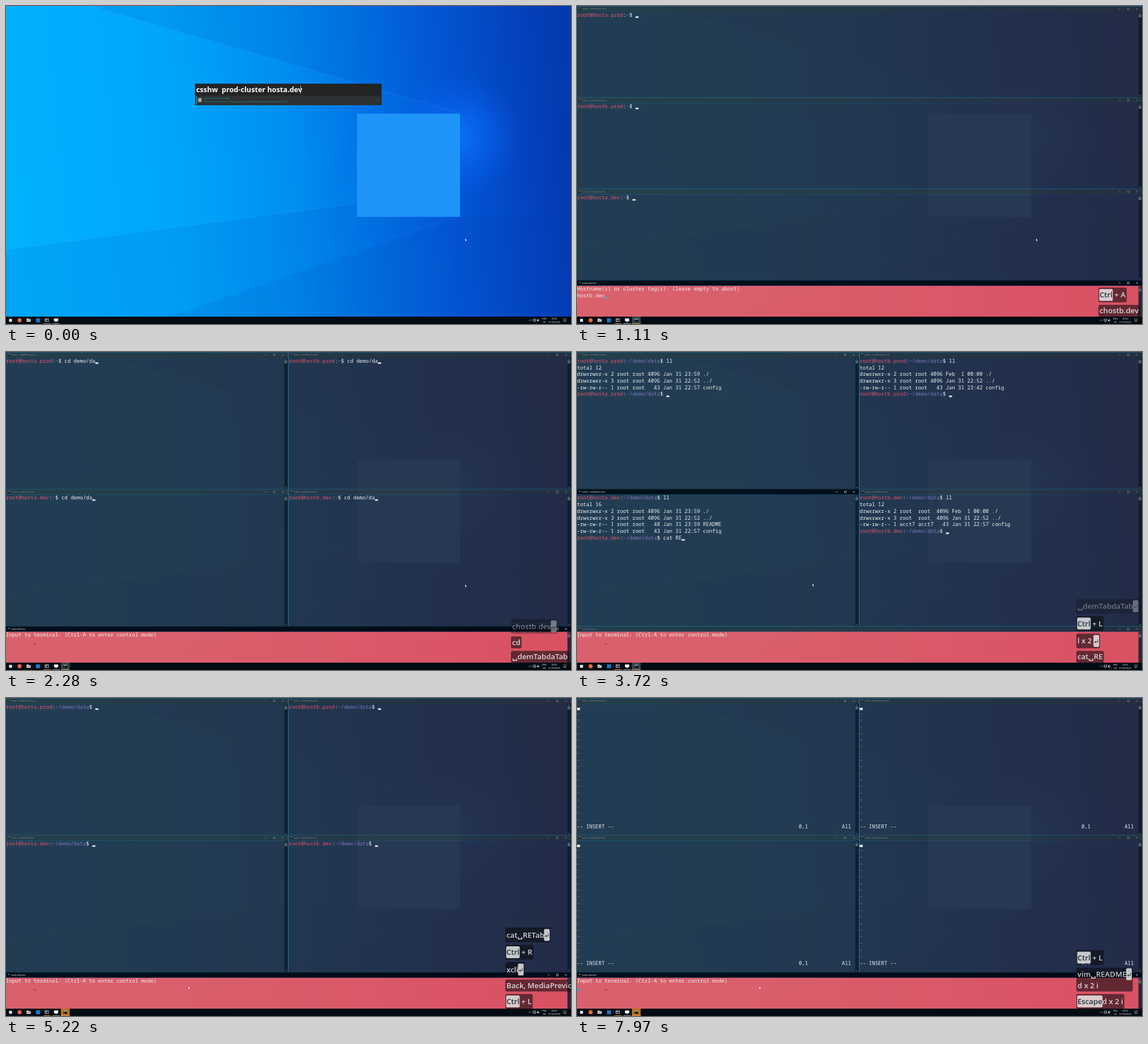
These frames come from a looping animation (998x561 px, 8000 ms). An HTML page with a canvas:

```html
<!DOCTYPE html>
<html lang="en">
<head>
<meta charset="utf-8">
<title>Cluster terminals</title>
<style>
html, body { margin: 0; width: 100%; height: 100%; overflow: hidden; background: #000; }
canvas { display: block; }
</style>
</head>
<body>
<canvas id="stage" width="998" height="561"></canvas>
<script>
const W = 998, H = 561, LOOP = 8000;
const CW = 5.44, LH = 11.72;
const MONO = '9.067px "Noto Sans Mono", "DejaVu Sans Mono", monospace';
const UI = '"Noto Sans", "Open Sans", sans-serif';
const KEYS = '600 13.2px "Open Sans", "Noto Sans", "DejaVu Sans", sans-serif';
const RED = '#e0576a', PURPLE = '#7f78c0', WHITE = '#eef1f2';
const HOSTS = ['hosta.prod', 'hostb.prod', 'hosta.dev', 'hostb.dev'];

const stage = document.getElementById('stage');
let g = stage.getContext('2d');

function box(x, y, w, h, color) {
  g.fillStyle = color;
  g.fillRect(x, y, w, h);
}

function poly(color, ...p) {
  g.fillStyle = color;
  g.beginPath();
  for (let i = 0; i < p.length; i += 2) g.lineTo(p[i], p[i + 1]);
  g.fill();
}

function line(color, width, ...p) {
  g.strokeStyle = color;
  g.lineWidth = width;
  g.beginPath();
  for (let i = 0; i < p.length; i += 2) g.lineTo(p[i], p[i + 1]);
  g.stroke();
}

function label(s, x, y, font, color) {
  g.font = font;
  g.fillStyle = color;
  g.fillText(s, x, y);
}

const typed = (t, start, step, s) =>
  t < start ? '' : s.slice(0, Math.floor((t - start) / step) + 1);
const after = (t, start, s) => t >= start ? s : '';

// Wallpaper, painted once
function paintWallpaper() {
  const c = document.createElement('canvas');
  c.width = W;
  c.height = H;
  const main = g;
  g = c.getContext('2d');
  const base = g.createLinearGradient(0, 330, W, 230);
  [[0, '#00b2ff'], [.3, '#00a6fb'], [.5, '#008ff1'], [.64, '#0074e6'],
   [.78, '#0358d8'], [.9, '#0345c2'], [1, '#0338ae']].forEach(s => base.addColorStop(...s));
  box(0, 0, W, H, base);
  poly('rgba(0,70,180,.13)', 150, 0, 800, 189, W, 189, W, 0);
  poly('rgba(0,70,180,.11)', 0, 430, 620, 348, 800, 373, W, 373, W, H, 0, H);
  poly('rgba(0,60,170,.1)', 800, 373, 250, H, W, H, W, 373);
  const glow = g.createRadialGradient(800, 230, 5, 800, 230, 110);
  glow.addColorStop(0, 'rgba(10,120,255,.75)');
  glow.addColorStop(1, 'rgba(10,100,255,0)');
  box(680, 110, 240, 250, glow);
  line('rgba(60,170,255,.28)', 1, 150, 0, 800, 189);
  line('rgba(60,200,255,.2)', 1, 0, 430, 620, 348);
  line('rgba(40,140,255,.2)', 1, 800, 373, 280, 530);
  box(620, 190, 182, 182, '#1f94f8');
  g = main;
  return c;
}

function launcher() {
  box(334, 137, 329.5, 38, '#222426');
  box(334, 158, 329.5, 17, '#2e3031');
  label('csshw  prod-cluster hosta.dev', 336, 152.4, '600 12.7px ' + UI, '#fff');
  box(520, 140, .8, 15, '#ccc');
  box(336, 159.5, 1.5, 14, '#1898ae');
  box(339.5, 162.5, 6, 7, '#a8a8a8');
  label('prod-cluster hosta.dev', 350, 164, '4.3px ' + UI, '#1f9db0');
  label('Custom command: C:\\Programming\\csshw\\target\\debug\\csshw.exe {{*}}', 350, 170, '4.3px ' + UI, '#1f9db0');
  label('#1', 655, 167.5, '4px ' + UI, '#1f8292');
}

function consoleIcon(x, y, s) {
  box(x - s, y - s * .8, s * 2, s * 1.6, '#05090c');
  box(x - s, y - s * .8, s * 2, s * .4, '#bfc8cc');
  line('#ddd', s * .2, x - s * .6, y - s * .1, x - s * .2, y + s * .2, x - s * .6, y + s * .5);
}

function taskbar(t) {
  box(0, 548, W, 13, '#030c13');
  const open = t >= 140, alert = t >= 5090;
  if (open) box(97, 548, 15.5, 13, alert ? '#b9721d' : '#33464c');
  box(5.5, 552, 5, 5, '#fff');
  g.fillStyle = '#f0663a';
  g.beginPath();
  g.arc(24, 554.3, 3.6, 0, 7);
  g.fill();
  poly('#e6e6e6', 36.5, 551.5, 39.5, 551.5, 40.5, 552.5, 43.5, 552.5, 43.5, 557, 36.5, 557);
  box(38, 554, 4, 1, '#39474f');
  box(53, 551, 7, 7, '#1478cc');
  box(68.5, 551.5, 7, 5.5, '#dce2e4');
  box(69.2, 552.7, 5.6, 3.6, '#182027');
  line('#fff', .7, 70, 553.2, 71.5, 554.4, 70, 555.6);
  box(84.8, 551.3, 7.4, 4.8, '#fff');
  box(87.5, 556, 2, 1.5, '#fff');
  if (open) {
    consoleIcon(104.7, 554.5, 3.2);
    box(97, 560, 15.5, 1, '#d98b45');
  }
  box(66, 560, 13, 1, open ? '#d98b45' : '#8fa6b0');
  box(82, 560, 13, 1, '#8fa6b0');
  const ink = '#e4e8ea', f = '4px ' + UI;
  line(ink, .7, 923.8, 555.5, 925.8, 553.5, 927.8, 555.5);
  g.strokeStyle = ink;
  g.lineWidth = .7;
  g.strokeRect(931, 552.5, 4.8, 3.2);
  box(932.5, 556.5, 2, .7, ink);
  poly(ink, 938, 553.5, 939.2, 553.5, 940.7, 552, 940.7, 557, 939.2, 555.6, 938, 555.6);
  line('#8a9399', .5, 942, 552.8, 942.7, 554.5, 942, 556.2);
  g.textAlign = 'center';
  label('ENG', 951, 553.2, f, ink);
  label('UK', 951, 559, f, ink);
  label('00:02', 968.5, 553.2, f, ink);
  label('01/02/2025', 968.5, 559, f, ink);
  g.textAlign = 'left';
  g.strokeStyle = ink;
  g.strokeRect(985, 552, 4.6, 3.8);
  box(986.5, 556, 1.4, 1.2, ink);
}

function frame(x, y, w, h, title, active, body = 'rgba(40,42,54,.85)') {
  box(x, y, w, 10, active ? 'rgba(1,8,15,.95)' : 'rgba(42,46,48,.87)');
  box(x, y + 10, w, h - 10, body);
  box(x, y, w, .8, active ? '#153646' : '#1c6288');
  const cy = y + 5, r = x + w, ink = active ? '#f2f4f5' : '#7f8d94';
  consoleIcon(x + 5, cy, 1.8);
  label(title, x + 8.7, cy + 1.3, '3.7px ' + UI, ink);
  line(ink, .6, r - 41, cy, r - 38, cy);
  g.strokeStyle = ink;
  g.strokeRect(r - 25.6, cy - 1.5, 3, 3);
  line(ink, .6, r - 10.5, cy - 1.6, r - 7.3, cy + 1.6);
  line(ink, .6, r - 10.5, cy + 1.6, r - 7.3, cy - 1.6);
  box(r - 6.3, y + 10, 6.3, h - 10, 'rgba(12,28,42,.82)');
  box(r - 6, y + 14.5, 4.6, 5.5, '#53636e');
  poly('#8c9aa2', r - 5, y + 12.8, r - 3.7, y + 11.3, r - 2.4, y + 12.8);
  if (h > 100) poly('#8c9aa2', r - 5, y + h - 3.2, r - 3.7, y + h - 1.7, r - 2.4, y + h - 3.2);
}

const write = (s, x, y, color = WHITE) => label(s, x, y, MONO, color);

function cursor(x, y, color = '#e4e9ea') {
  box(x, y - .5, CW, 2.6, color);
}

// A prompt line is [host, path, command]; anything else is plain output
function drawLines(lines, x, y) {
  lines.forEach((l, i) => {
    const by = y + i * LH;
    let n = l.length;
    if (Array.isArray(l)) {
      const [host, path, cmd] = l, who = 'root@' + host;
      let cx = x;
      for (const [s, c] of [[who, RED], [':', WHITE], [path, PURPLE], ['$ ' + cmd, WHITE]]) {
        write(s, cx, by, c);
        cx += s.length * CW;
      }
      n = who.length + path.length + cmd.length + 3;
    } else write(l, x, by);
    if (i === lines.length - 1) cursor(x + n * CW, by);
  });
}

function listing(i) {
  const wide = i === 3, who = wide ? 'acct7 acct7' : 'root root', gap = wide ? 'root  root ' : 'root root';
  const rows = [
    i === 2 ? 'total 16' : 'total 12',
    `drwxrwxr-x 2 ${gap} 4096 ${i % 2 ? 'Feb  1 00:00' : 'Jan 31 23:59'} ./`,
    `drwxrwxr-x 3 ${gap} 4096 Jan 31 22:52 ../`
  ];
  if (i === 2) rows.push('-rw-rw-r-- 1 root root   48 Jan 31 23:59 README');
  rows.push(`-rw-rw-r-- 1 ${who}   43 Jan 31 ${i === 1 ? '23:42' : '22:57'} config`);
  return rows;
}

const NOTE = 'This demo file is shared by the whole cluster.';

function shell(i, t) {
  const host = HOSTS[i], home = '~', data = '~/demo/data';
  const ready = [490, 350, 560, 1500][i];
  if (t < ready) return [''];
  if (t < 2410) {
    const cmd = typed(t, 1730, 60, 'cd') + typed(t, 1870, 50, ' dem') +
      after(t, 2080, 'o/') + typed(t, 2150, 60, 'da') + after(t, 2340, 'ta/');
    return [[host, home, cmd]];
  }
  if (t < 2540) return [[host, home, 'cd demo/data/'], [host, data, '']];
  if (t >= 5150) {
    const cmd = typed(t, 5500, 75, 'vim READ') + typed(t, 6190, 70, 'ME');
    return [[host, data, cmd]];
  }
  const lines = [[host, data, typed(t, 2680, 90, 'll')]];
  if (t < 2920) return lines;
  lines.push(...listing(i));
  if (i !== 2) return [...lines, [host, data, '']];
  lines.push([host, data, typed(t, 3370, 60, 'cat RE') + after(t, 3790, 'ADME')]);
  if (t < 4000) return lines;
  lines.push(NOTE);
  const copy = 'cat README | xclip';
  if (t >= 4210 && t < 4700) {
    const q = typed(t, 4350, 70, 'xcli');
    lines.push("(reverse-i-search)`" + q + "': " + (q ? copy : ''));
  } else if (t >= 4700) lines.push([host, data, copy], [host, data, '']);
  else lines.push([host, data, '']);
  return lines;
}

function editor(i, t, x, y) {
  const full = i === 2 && t < 6760;
  const insert = t >= 6900 && t < 7130 || t >= 7900;
  if (full) write(NOTE, x, y);
  box(x, y - 1.6, CW, 4.2, '#dfe5e8');
  for (let r = 1; r < 18; r++) write('~', x, y + r * LH, PURPLE);
  const by = y + 18 * LH;
  let msg = '';
  if (insert) msg = '-- INSERT --';
  else if (t < 6760) msg = i === 2 ? '"README" 1L, 48C' : '"README" [New File]';
  else if (t < 6900 || t >= 7480) msg = '--No lines in buffer--';
  write(msg, x, by);
  write(full ? '1,1' : insert ? '0,1' : '0,0-1', x + 72 * CW, by);
  write('All', x + 86 * CW, by);
}

function loading(y, w, h, top) {
  box(655, y + 10, 337, 145, 'rgba(1,7,18,.94)');
  box(655, top, w, h, '#dcebfa');
  box(0, y + 155, 992, 6, 'rgba(12,28,42,.82)');
  box(5, y + 155.5, 6, 5, '#53636e');
}

function rows(t) {
  for (let i = 0; i < 3; i++) {
    const y = i * 161.2, opening = t < 350 && i !== 1;
    frame(0, y, W, 161.2, opening ? 'csshw.exe' : 'csshw - root@' + HOSTS[i], opening && i === 0);
    if (opening) i ? loading(y, 60, 80, 332) : loading(y, 68, 97, 58);
    if (i !== 1 || t >= 350) drawLines(shell(i, t), 0, y + 18.8);
  }
}

function grid(t) {
  for (let i = 0; i < 4; i++) {
    const x = i % 2 ? 499 : 0, y = i > 1 ? 241.6 : 0;
    const title = i === 3 && t < 1500 ? 'csshw.exe' : 'csshw - root@' + HOSTS[i];
    frame(x, y, i % 2 ? 499 : 498, 242, title, i === 2 && t >= 3300 && t < 5090);
    const tx = i % 2 ? 499.3 : 0, ty = y + 18.8;
    if (t < 6480) drawLines(shell(i, t), tx, ty);
    else editor(i, t, tx, ty);
  }
  box(498, 0, 1, 484, '#1d7fae');
}

function daemon(t) {
  const active = t >= 350 && (t < 3300 || t >= 5090);
  frame(0, 483.6, W, 65, 'csshw daemon', active, 'rgba(255,85,85,.85)');
  if (t < 350) return;
  const y = 502.3;
  if (t >= 620 && t < 830) {
    write('Control Mode (Esc to exit)', 0, y);
    write('[c]reate window(s), [r]etile, copy active [h]ostname(s)', 0, y + LH);
  } else if (t >= 830 && t < 1250) {
    const s = typed(t, 900, 25, 'hostb.dev');
    write('Hostname(s) or cluster tag(s): (leave empty to abort)', 0, y);
    write(s, 0, y + LH);
    cursor(s.length * CW, y + LH, '#35b4c8');
  } else {
    write('Input to terminal: (Ctrl-A to enter control mode)', 0, y);
    if (t >= 1250) cursor(9 * CW - 1, y + LH, '#d0435a');
    const blink = t % 1060;
    if (active && blink > 300 && blink < 830) cursor(0, y + LH, '#2fa9d0');
  }
}

// Key caps are written in brackets
const strokes = [
  [70, 560, () => '[↵]'],
  [620, 1900, () => '[Ctrl] + A'],
  [830, 2500, t => 'c' + typed(t, 900, 25, 'hostb.dev') + after(t, 1180, '[↵]')],
  [1730, 3300, t => typed(t, 1730, 60, 'cd')],
  [1870, 3900, t => typed(t, 1870, 50, '␣dem') + after(t, 2080, 'Tab') +
    typed(t, 2150, 60, 'da') + after(t, 2270, 'Tab') + after(t, 2410, '[↵]')],
  [2540, 4500, () => '[Ctrl] + L'],
  [2680, 4700, t => 'l' + after(t, 2770, ' x 2 ') + after(t, 2900, '[↵]')],
  [3370, 6300, t => typed(t, 3370, 60, 'cat␣RE') + after(t, 3780, 'Tab') + after(t, 3950, '[↵]')],
  [4210, 6500, () => '[Ctrl] + R'],
  [4350, 6700, t => typed(t, 4350, 70, 'xcli') + after(t, 4690, '[↵]')],
  [4900, 6900, () => 'Back, MediaPreviousTrack'],
  [5150, 9000, () => '[Ctrl] + L'],
  [5500, 9000, t => typed(t, 5500, 75, 'vim␣READ') + typed(t, 6190, 70, 'ME') + after(t, 6400, '[↵]') +
    after(t, 6680, '\nd') + after(t, 6750, ' x 2') + after(t, 6900, ' i')],
  [7130, 9000, t => '[Escape]' + after(t, 7400, 'd') + after(t, 7480, ' x 2') + after(t, 7900, ' i')]
];

const edges = [[2410, 882], [2200, 892], [1870, 905], [1180, 911], [830, 921], [620, 943], [0, 981]];

function keyRow(s, x, cy, paint) {
  g.font = KEYS;
  for (const part of s.match(/\[[^\]]+\]|[^\[]+/g) || []) {
    const cap = part[0] === '[', str = cap ? part.slice(1, -1) : part;
    const enter = str === '↵';
    const w = enter ? 9 : g.measureText(str).width;
    if (paint) {
      if (cap) {
        g.fillStyle = 'rgba(255,255,255,.76)';
        g.beginPath();
        g.roundRect(x - .5, cy - 10.5, w + 1, 21, 2);
        g.fill();
      }
      g.fillStyle = cap ? '#26303a' : 'rgba(255,255,255,.8)';
      if (enter) {
        line('#26303a', 1, x + 7, cy - 2.5, x + 7, cy + 2, x + 2.5, cy + 2);
        poly('#26303a', x + 1, cy + 2, x + 4, cy, x + 4, cy + 4);
      } else g.fillText(str, x, cy + 4.6);
    }
    x += w;
  }
  return x;
}

function overlay(t) {
  const left = edges.find(e => t >= e[0])[1];
  let bottom = 548.3;
  for (const [from, to, text] of [...strokes].reverse()) {
    if (t < from || t >= to) continue;
    const parts = text(t).split('\n');
    const h = parts.length > 1 ? 42 : parts[0].includes('[') ? 26 : 21;
    const top = bottom - h;
    const right = Math.max(...parts.map(p => keyRow(p, left + 2, 0, false)));
    g.globalAlpha = Math.min(1, (to - t) / 400);
    g.fillStyle = 'rgba(8,10,14,.56)';
    g.beginPath();
    g.roundRect(left, top, Math.min(right + 2, W) - left, h, 3);
    g.fill();
    parts.forEach((p, i) => {
      const cy = parts.length > 1 ? top + 11.5 + i * 20 : top + h / 2;
      keyRow(p, left + 2, cy, true);
    });
    g.globalAlpha = 1;
    bottom = top - 4.6;
  }
}

function pointer(t) {
  const ease = (a, b) => {
    const k = Math.max(0, Math.min(1, (t - a) / (b - a)));
    return k * k * (3 - 2 * k);
  };
  const p = ease(2950, 3270), q = ease(4720, 5050);
  const x = 811 - 395 * p - 94 * q, y = 410.5 - 1.5 * p + 100 * q;
  poly('#fff', x, y, x + 2.6, y + 2.8, x + 1.5, y + 2.9, x + 1.9, y + 4.2, x + 1, y + 4.2, x + .7, y + 3.2, x, y + 3.8);
}

const wallpaper = paintWallpaper();

function draw(t) {
  g.drawImage(wallpaper, 0, 0);
  if (t < 70) launcher();
  if (t >= 140) {
    t < 1320 ? rows(t) : grid(t);
    daemon(t);
  }
  taskbar(t);
  overlay(t);
  pointer(t);
}

const start = performance.now();
function tick() {
  draw((performance.now() - start) % LOOP);
  requestAnimationFrame(tick);
}
draw(0);
requestAnimationFrame(tick);
</script>
</body>
</html>
```
